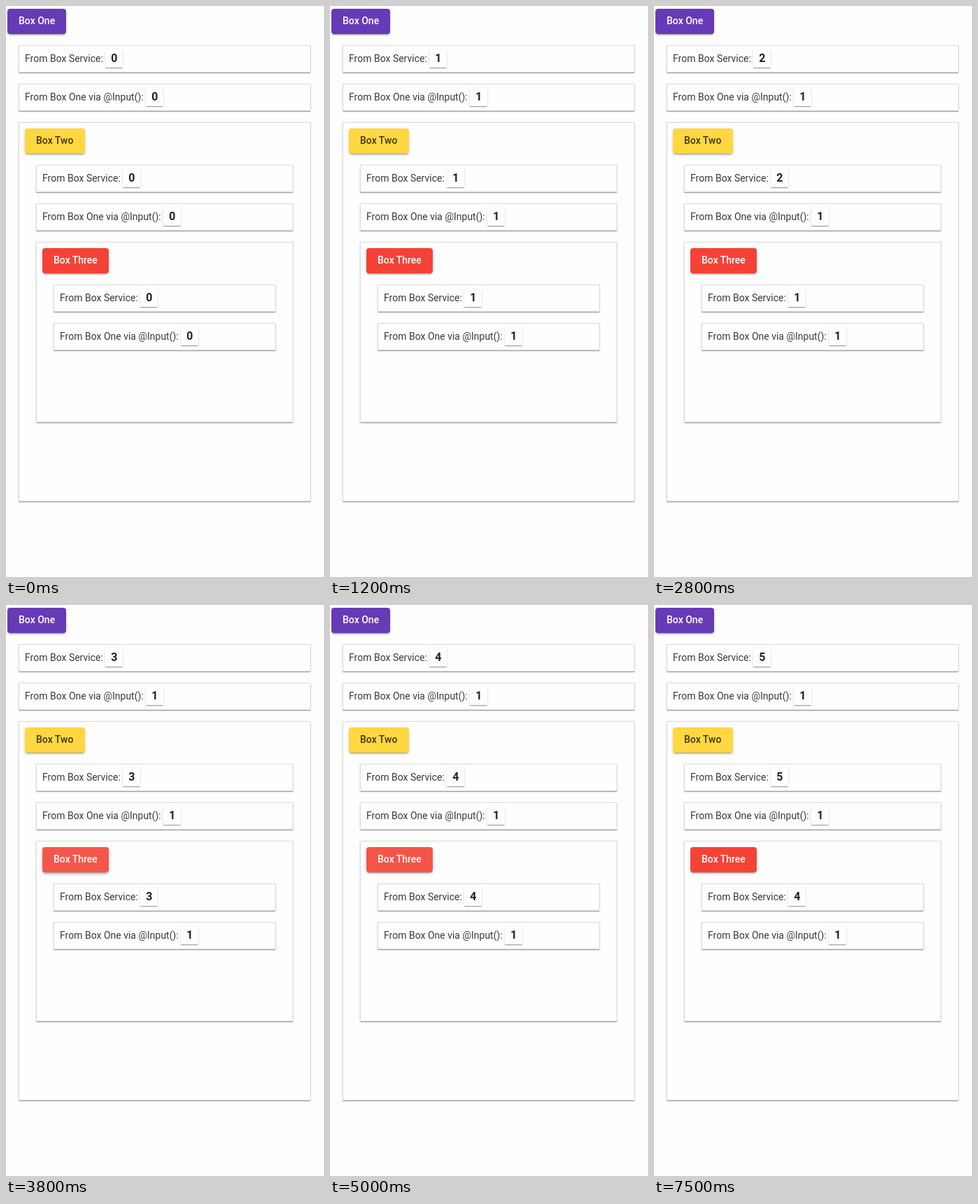
An HTML page that plays this animation: 455 by 816 pixels, repeating every 8000 ms.

```html
<!DOCTYPE html>
<html lang="en">
<head>
<meta charset="utf-8">
<style>
  html, body { margin: 0; width: 100%; height: 100%; overflow: hidden; background: #fefefe; }
  #stage { position: relative; width: 455px; height: 816px; overflow: hidden;
    font: 14px Roboto, sans-serif; color: rgba(0, 0, 0, .78); }
  .card, .button { position: absolute; box-sizing: border-box; white-space: nowrap; }
  .card { padding-left: 8px; line-height: 37px; background: #fefefe; border: 1px solid #dcdcdc;
    box-shadow: 0 2px 1px -1px rgba(0, 0, 0, .2), 0 1px 1px rgba(0, 0, 0, .14), 0 1px 3px rgba(0, 0, 0, .1); }
  .count { display: inline-block; padding: 4px 8px; font-size: 16px; font-weight: 700; line-height: 18px;
    color: rgba(0, 0, 0, .87);
    box-shadow: 0 2px 1px -1px rgba(0, 0, 0, .2), 0 1px 1px rgba(0, 0, 0, .14), 0 1px 3px rgba(0, 0, 0, .12); }
  .button { height: 36px; padding-left: 16px; line-height: 34px; font-weight: 500; border-radius: 4px; }
  .clip { position: absolute; inset: 0; overflow: hidden; border-radius: 4px; }
  .ripple { position: absolute; border-radius: 50%; }
</style>
</head>
<body>
<div id="stage"></div>
<script>
const LOOP = 8000, STEP = 100;
const stage = document.getElementById('stage');

const boxes = [
  { name: 'Box One', x: 2, y: 4, width: 84, fill: '#673ab7', ink: '#fff', ripple: '#fff', center: [44, 22] },
  { name: 'Box Two', x: 27, y: 175, width: 86, fill: '#ffd740', ink: 'rgba(0,0,0,.75)', ripple: '#000', center: [43, 27] },
  { name: 'Box Three', x: 52, y: 346, width: 95, fill: '#f44336', ink: '#fff', ripple: '#fff', center: [47, 24] }
];

// Service counts are listed per box; input is shared by all boxes.
const quick = [.3, .8, .15];
const clicks = [
  { box: 0, at: 500, release: 1000, grow: [.2, .6, .87, 1], fade: [.5, .17, 0], lift: [.3, .8, .4, .1], service: [1, 1, 1] },
  { box: 1, at: 2100, release: 2500, lift: [.2, .7, 1], drop: [.3, 0], service: [2, 2, 1] },
  { box: 2, at: 3600, release: 4000, lift: quick, service: [3, 3, 3] },
  { box: 2, at: 4600, release: 5000, lift: quick, service: [4, 4, 4] },
  { box: 1, at: 6600, release: 7000, lift: [0, .8, .15], service: [5, 5, 4] }
];

function add(parent, className, style, text = '') {
  const node = document.createElement('div');
  node.className = className;
  node.textContent = text;
  Object.assign(node.style, style);
  parent.append(node);
  return node;
}

function addCard(x, y, height, label) {
  const card = add(stage, 'card', {
    left: x + 'px', top: y + 'px', width: 454 - 2 * x + 'px', height: height + 'px'
  });
  if (!label) return;
  card.append(label + ' ');
  return add(card, 'count', {}, '0');
}

boxes.forEach((box, i) => {
  const x = box.x + 16;
  box.service = addCard(x, box.y + 52, 39, 'From Box Service:');
  box.input = addCard(x, box.y + 107, 39, 'From Box One via @Input():');
  if (i < 2) addCard(x, box.y + 162, i ? 258 : 542);
  box.button = add(stage, 'button', {
    left: box.x + 'px', top: box.y + 'px', width: box.width + 'px',
    background: box.fill, color: box.ink
  }, box.name);
  box.wave = add(add(box.button, 'clip', {}), 'ripple', { background: box.ripple });
});

const sample = (values, elapsed) => values[Math.min(Math.floor(elapsed / STEP), values.length - 1)];

function shadow(lift) {
  const layer = (from, to, alpha) =>
    from.map((v, i) => v + (to[i] - v) * lift + 'px').join(' ') + ` rgba(0,0,0,${alpha})`;
  return [
    layer([0, 3, 1, -2], [0, 5, 5, -3], .2),
    layer([0, 2, 2, 0], [0, 8, 10, 1], .14),
    layer([0, 1, 5, 0], [0, 3, 14, 2], .12)
  ].join(',');
}

function drawButton(box, radius, opacity, lift) {
  const [cx, cy] = box.center;
  Object.assign(box.wave.style, {
    left: cx - radius + 'px', top: cy - radius + 'px',
    width: 2 * radius + 'px', height: 2 * radius + 'px', opacity
  });
  box.button.style.boxShadow = shadow(lift);
}

function render(time) {
  const counted = clicks.filter(click => time >= click.at + 2 * STEP);
  const service = counted.length ? counted[counted.length - 1].service : [0, 0, 0];
  const current = clicks.filter(click => time >= click.at).pop();

  boxes.forEach((box, i) => {
    box.service.textContent = service[i];
    box.input.textContent = counted.length ? 1 : 0;
    if (!current || current.box !== i) return drawButton(box, 0, 0, 0);

    const { at, release, lift, grow = [.255, .72, 1], fade = [.95, .45, .17, 0], drop = [0] } = current;
    const [cx, cy] = box.center;
    const reach = Math.hypot(Math.max(cx, box.width - cx), Math.max(cy, 36 - cy));
    const released = time >= release;
    drawButton(box, reach * sample(grow, time - at),
      released ? .1 * sample(fade, time - release) : .1,
      released ? sample(drop, time - release) : sample(lift, time - at));
  });
}

const start = performance.now();
function tick() {
  render((performance.now() - start) % LOOP);
  requestAnimationFrame(tick);
}
tick();
</script>
</body>
</html>
```
